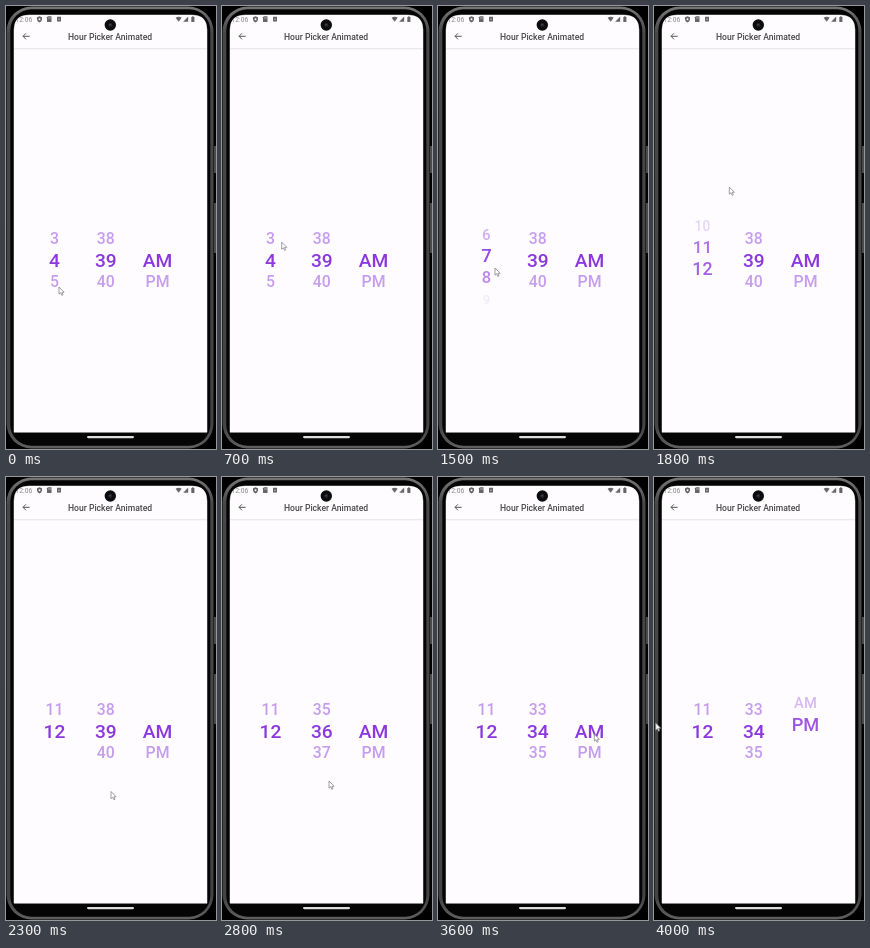
Write an HTML page that moves like this. It is 210 by 443 pixels and loops after 4.1 s.

```html
<!DOCTYPE html>
<html lang="en">
<head>
<meta charset="utf-8">
<title>Hour Picker</title>
<style>
html, body { margin: 0; width: 100%; height: 100%; overflow: hidden; background: #000; }
svg { display: block; width: 100vw; height: 100vh; }
text { font-family: Roboto, "Noto Sans", sans-serif; }
.wheel text { font-weight: 500; fill: #8b38de; text-anchor: middle; }
</style>
</head>
<body>
<svg viewBox="0 0 210 443" preserveAspectRatio="none">
  <defs>
    <path id="glass" d="M8 426.3V24Q8 9 23 9H186Q201 9 201 24V426.3Z"/>
    <clipPath id="screen"><use href="#glass"/></clipPath>
    <linearGradient id="rim" x1="0" y1="0" x2="0" y2="1">
      <stop offset="0" stop-color="#777"/>
      <stop offset=".06" stop-color="#484848"/>
      <stop offset=".95" stop-color="#444"/>
      <stop offset="1" stop-color="#606060"/>
    </linearGradient>
  </defs>
  <rect width="210" height="443" fill="#000"/>
  <path d="M209 140V167M209 197V247" stroke="#4a4a4a" stroke-width="2"/>
  <rect x=".5" y=".5" width="207" height="442" rx="25" fill="url(#rim)"/>
  <rect x="4.3" y="3.3" width="200" height="436.4" rx="21" fill="#050505"/>
  <use href="#glass" fill="none" stroke="#777"/>
  <g clip-path="url(#screen)">
    <rect x="8" y="9" width="193" height="418" fill="#fefcfe"/>
    <path d="M8 42.5H201" stroke="#ebe9ed"/>
    <path d="M8 43.5H201" stroke="#f6f5f7"/>
    <text x="9.5" y="15.8" font-size="6.7" fill="#888">12:06</text>
    <g fill="#666">
      <path d="M33.5 10.2L36 11.2V13.2Q36 15.5 33.5 16.4Q31 15.5 31 13.2V11.2Z"/>
      <path d="M42 10.3H45.5V16H41V11.3Z"/>
      <path d="M51 10.8H55V15.6H51Z"/>
      <path d="M169.6 11.7Q172.6 9.7 175.6 11.7L172.6 15.8Z"/>
      <path d="M182.2 10.5V15.8H177.2Z"/>
      <path d="M185.3 11H186.2V10.2H187.5V11H188.4V16H185.3Z"/>
    </g>
    <circle cx="33.5" cy="13.2" r="1" fill="#fff"/>
    <path d="M42.8 11.4V12.6M44.2 11.4V12.6M52.2 13.2H53.8" stroke="#fff" stroke-width=".6"/>
    <path d="M23.6 30.3H17.2M20 27.3L17 30.3L20 33.3" fill="none" stroke="#444" stroke-width=".9"/>
    <text x="62" y="33.5" font-size="8.58" font-weight="500" fill="#484848">Hour Picker Animated</text>
  </g>
  <circle cx="104.3" cy="19" r="5.7" fill="#0c0c0f"/>
  <circle cx="104.3" cy="19" r="2" fill="#24272f"/>
  <circle cx="104" cy="18.6" r=".7" fill="#50545f"/>
  <rect x="81" y="430" width="47" height="2.2" rx="1.1" fill="#ddd"/>
  <g class="wheel" id="hours"></g>
  <g class="wheel" id="minutes"></g>
  <g class="wheel" id="halves"></g>
  <path id="cursor" d="M0 0V7.2L1.7 5.7L2.8 8.3L4 7.8L2.9 5.3H5.1Z" fill="#fff" stroke="#808080" stroke-width=".75" stroke-linejoin="round"/>
</svg>
<script>
const LOOP = 4100, STEP = 100, MID = 254, GAP = 21.5;
const $ = id => document.getElementById(id);

// Turning points of the pointer: ms, x, y
const path = [[200, 53, 281], [500, 152, 254], [750, 49, 234], [1200, 59, 184.5],
  [1500, 57, 262], [1800, 75.3, 181], [2300, 105, 314.5], [2500, 103, 240],
  [2800, 107, 304], [3100, 152, 294], [3600, 156.3, 257], [3800, 154, 208], [4000, 1.7, 246]];

// Smooth 0 to 1 between two times
function ease(t, from, to) {
  const p = Math.min(1, Math.max(0, (t - from) / (to - from)));
  return p * p * (3 - 2 * p);
}

function pointer(t) {
  const i = Math.max(1, path.findIndex(k => k[0] >= t));
  const [t0, x0, y0] = path[i - 1], [t1, x1, y1] = path[i];
  const p = ease(t, t0, t1);
  return [x0 + (x1 - x0) * p, y0 + (y1 - y0) * p];
}

function makeWheel(id, x, first, last, label) {
  const slots = Array.from({ length: 5 }, () => {
    const el = document.createElementNS("http://www.w3.org/2000/svg", "text");
    el.setAttribute("x", x);
    return $(id).appendChild(el);
  });
  return pos => slots.forEach((el, i) => {
    const n = Math.round(pos) + i - 2;
    const d = Math.abs(n - pos);
    const shown = n >= first && n <= last && d < 2;
    const size = 19.2 - 3.4 * d;
    el.textContent = shown ? label(n) : "";
    el.setAttribute("font-size", size);
    el.setAttribute("y", MID + (n - pos) * GAP + size * .356);
    el.setAttribute("opacity", d < 1 ? 1 - .52 * d : Math.max(0, .48 * (2 - d)));
  });
}

const hours = makeWheel("hours", 48.4, 1, 12, String);
const minutes = makeWheel("minutes", 99.8, 0, 59, n => String(n).padStart(2, "0"));
const halves = makeWheel("halves", 151.5, 0, 1, n => n ? "PM" : "AM");

function draw(ms) {
  const t = Math.floor(ms % LOOP / STEP) * STEP;
  hours(4 + 3 * ease(t, 700, 1430) + 5 * ease(t, 1450, 1875));
  minutes(39 - 3 * ease(t, 2500, 2800) - 2 * ease(t, 2850, 3250));
  halves(1.3 * ease(t, 3600, 3900));
  $("cursor").setAttribute("transform", `translate(${pointer(t)})`);
}

const start = performance.now();
function tick() {
  draw(performance.now() - start);
  requestAnimationFrame(tick);
}
tick();
</script>
</body>
</html>
```
